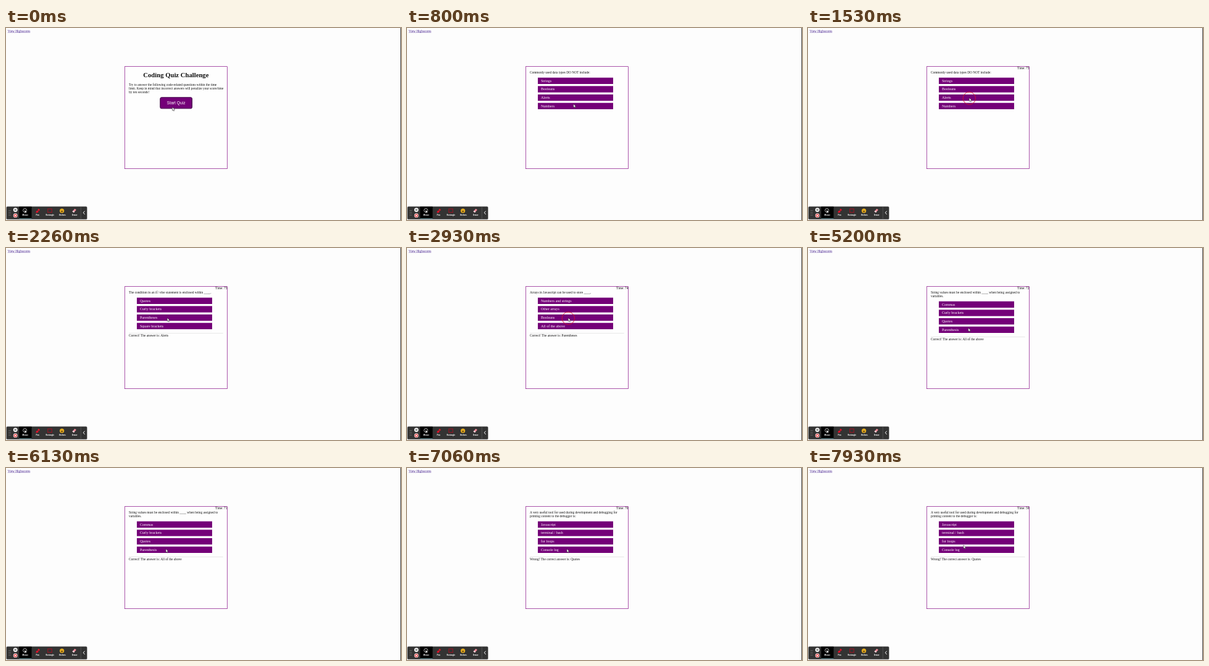
An HTML page that plays this animation: 640x312 px, repeating every 8000 ms.

```html
<!DOCTYPE html>
<html lang="en">
<head>
<meta charset="utf-8">
<title>Coding Quiz</title>
<style>
  html, body { margin: 0; width: 100%; height: 100%; overflow: hidden; background: #fdfdfd; }
  #page {
    position: absolute; left: 0; top: 0; width: 1920px; height: 936px;
    transform: scale(calc(1 / 3)); transform-origin: 0 0;
    font: 16px/18px "Liberation Serif", serif; color: #111;
  }
  #page > *, .screen > * { position: absolute; }
  #link { left: 8px; top: 8px; color: #45208f; text-decoration: underline; }
  #box {
    left: 576px; top: 187px; width: 500px; height: 500px;
    box-sizing: border-box; border: 2px solid #800080; background: #fefefe;
  }
  #timer { right: 845px; top: 188px; white-space: pre; }
  .screen { left: 597px; top: 207px; width: 458px; white-space: pre; }
  .screen[hidden] { display: none; }
  h1 { left: 0; top: 3px; width: 100%; margin: 0; text-align: center; font: bold 32px/37px "Liberation Serif", serif; }
  .intro { left: 0; top: 60px; }
  .start {
    left: 151px; top: 130px; width: 158px; height: 57px; box-sizing: border-box;
    border: 3px solid #3d0043; border-radius: 8px; background: #740078; color: #fff;
    text-align: center; font: 20px/50px "Liberation Sans", sans-serif;
  }
  .option {
    left: 39px; width: 366px; height: 31px; box-sizing: border-box; padding-left: 15px;
    background: #740078; color: #fff; font-size: 18px; line-height: 31px;
  }
  .rule { left: 0; width: 458px; height: 2px; background: #ddd; }
  #overlay { position: absolute; left: 0; top: 0; }
  #overlay text { font: bold 3px Roboto, sans-serif; fill: #fff; text-anchor: middle; }
</style>
</head>
<body>
<div id="page">
  <div id="link">View Highscores</div>
  <div id="box"></div>
  <div id="timer"></div>
</div>
<svg id="overlay" width="640" height="312" viewBox="0 0 640 312">
  <rect x="639" width="1" height="312" fill="#444"/>
  <g id="toolbar">
    <rect x=".3" y="289.8" width="131.4" height="21.6" rx="2" fill="#777" opacity=".45"/>
    <rect x=".8" y="290.2" width="130.4" height="20.6" rx="1.6" fill="#333"/>
    <path d="M5 296.5v9M7 296.5v9" stroke="#999" stroke-dasharray="1 2.5"/>
    <circle cx="15.2" cy="295.6" r="3.4" fill="#fff"/>
    <path d="M14.3 294v3.2M16.1 294v3.2" stroke="#333" stroke-width=".9"/>
    <circle cx="15.2" cy="304.7" r="3.4" fill="#fff"/>
    <circle cx="15.2" cy="304.7" r="2.7" fill="#e5484d"/>
    <rect x="14.1" y="303.6" width="2.2" height="2.2" fill="#fff"/>
    <rect x="21.3" y="290.2" width="20.2" height="20" fill="#000"/>
    <rect x="21.3" y="309.3" width="20.2" height=".9" fill="#7fb5bd"/>
    <circle cx="30.6" cy="296.4" r="3" fill="none" stroke="#ddd" stroke-width=".8"/>
    <path d="M30.5 295.5v5l1.2-1 1.8.2z" fill="#fff"/>
    <path d="M48.3 300.3l.8-2.8 2.2-1 1.5 1.5-1.3 2zM51.2 295.5l1.6-2 2.2 2-1.8 2z" fill="#e0122b"/>
    <rect x="67.8" y="294" width="6.4" height="5.8" fill="none" stroke="#b00d20" stroke-width=".9"/>
    <circle cx="90.6" cy="297" r="3.6" fill="#f5b921"/>
    <path d="M88.8 295.8h1.2M91.3 295.8h1.2M88.7 297.7q1.9 2.5 3.8 0z" fill="#5b3a12" stroke="#5b3a12" stroke-width=".6"/>
    <path d="M107.4 298.3l4-4.6 2.5 1.8-4 4.6z" fill="#f08a98"/>
    <path d="M107.4 298.3l1.4-1.6 2.5 1.8-1.4 1.6z" fill="#f4d9dc"/>
    <path d="M121.3 290.2v20.6" stroke="#666" stroke-width=".6"/>
    <path d="M127.6 297.5l-2.4 2.7 2.4 2.7" fill="none" stroke="#fff"/>
  </g>
  <circle id="ring" r="10.2" fill="none" stroke="#d3122e" stroke-width=".9"/>
  <path id="cursor" d="M0 0v5.7l1.3-1.2.9 2 .9-.4-.9-1.9h1.8z" fill="#fff" stroke="#111" stroke-width=".45"/>
</svg>
<script>
const LOOP = 8000;
const $ = id => document.getElementById(id);

const questions = [
  { at: 430, text: 'Commonly used data types DO NOT include:',
    options: ['Strings', 'Booleans', 'Alerts', 'Numbers'] },
  { at: 1600, text: 'The condition in an if / else statement is enclosed within ____.',
    options: ['Quotes', 'Curly brackets', 'Parentheses', 'Square brackets'],
    result: 'Correct! The answer is: Alerts' },
  { at: 2900, text: 'Arrays in Javascript can be used to store ____.',
    options: ['Numbers and strings', 'Other arrays', 'Booleans', 'All of the above'],
    result: 'Correct! The answer is: Parentheses' },
  { at: 3900, text: 'String values must be enclosed within ____ when being assigned to\nvariables.',
    options: ['Commas', 'Curly brackets', 'Quotes', 'Parenthesis'],
    result: 'Correct! The answer is: All of the above' },
  { at: 6860, text: 'A very useful tool for used during development and debugging for\nprinting content to the debugger is:',
    options: ['Javascript', 'terminal / bash', 'for loops', 'Console log'],
    result: 'Wrong! The correct answer is: Quotes' }
];

// time, x, y of the pointer tip
const path = [
  [0, 269.5, 128.5], [280, 269.8, 123.5], [900, 269.8, 123.5], [1380, 261.3, 113.5],
  [3060, 261.3, 113.5], [3600, 260.5, 125], [3900, 260.5, 125], [4130, 260.3, 128.5],
  [4730, 259.8, 130], [5130, 259.8, 130], [5930, 259, 131.5],
  [7060, 259, 131.5], [7860, 252, 125.3]
];
const clicks = [[340, 520], [1460, 1660], [2830, 3030], [3730, 3930], [6730, 7060]];
const TIMER_START = 1430;
const PENALTY_AT = 6860;

function add(parent, className, text = '', top) {
  const el = document.createElement(className === 'title' ? 'h1' : 'div');
  el.className = className;
  el.textContent = text;
  if (top !== undefined) el.style.top = top + 'px';
  return parent.appendChild(el);
}

function introScreen() {
  const screen = add($('page'), 'screen');
  add(screen, 'title', 'Coding Quiz Challenge');
  add(screen, 'intro', 'Try to answer the following code-related questions within the time\n' +
    'limit. Keep in mind that incorrect answers will penalize your score/time\nby ten seconds!');
  add(screen, 'start', 'Start Quiz');
  return { at: 0, screen };
}

function questionScreen({ at, text, options, result }) {
  const screen = add($('page'), 'screen');
  const shift = text.includes('\n') ? 18 : 0;
  add(screen, 'question', text, 0);
  options.forEach((label, i) => add(screen, 'option', label, 35 + shift + 41 * i));
  if (result) {
    add(screen, 'rule', '', 208 + shift);
    add(screen, 'result', result, 210 + shift);
  }
  return { at, screen };
}

const screens = [introScreen(), ...questions.map(questionScreen)];

['Mouse', 'Pen', 'Rectangle', 'Stickers', 'Eraser'].forEach((label, i) => {
  const text = document.createElementNS('http://www.w3.org/2000/svg', 'text');
  text.setAttribute('x', 31.2 + 20 * i);
  text.setAttribute('y', 305.2);
  text.textContent = label;
  $('toolbar').append(text);
});

function pointerAt(t) {
  const next = path.findIndex(p => p[0] > t);
  if (next < 0) return path[path.length - 1].slice(1);
  const [t0, x0, y0] = path[next - 1], [t1, x1, y1] = path[next];
  const k = (t - t0) / (t1 - t0), ease = k * k * (3 - 2 * k);
  return [x0 + (x1 - x0) * ease, y0 + (y1 - y0) * ease];
}

function timerAt(t) {
  if (t < TIMER_START) return '';
  const ticks = Math.floor((t - TIMER_START) / 1000);
  const shownAt = TIMER_START + ticks * 1000;
  return 'Time: ' + (75 - ticks - (shownAt >= PENALTY_AT ? 10 : 0));
}

function draw() {
  const t = performance.now() % LOOP;
  const current = screens.filter(s => s.at <= t).pop();
  screens.forEach(s => { s.screen.hidden = s !== current; });
  $('timer').textContent = timerAt(t);

  const [x, y] = pointerAt(t);
  $('cursor').setAttribute('transform', `translate(${x} ${y})`);
  $('ring').setAttribute('transform', `translate(${x} ${y + .7})`);
  const pressed = clicks.some(([from, to]) => t >= from && t < to);
  $('ring').style.visibility = pressed ? 'visible' : 'hidden';
  requestAnimationFrame(draw);
}
draw();
</script>
</body>
</html>
```
